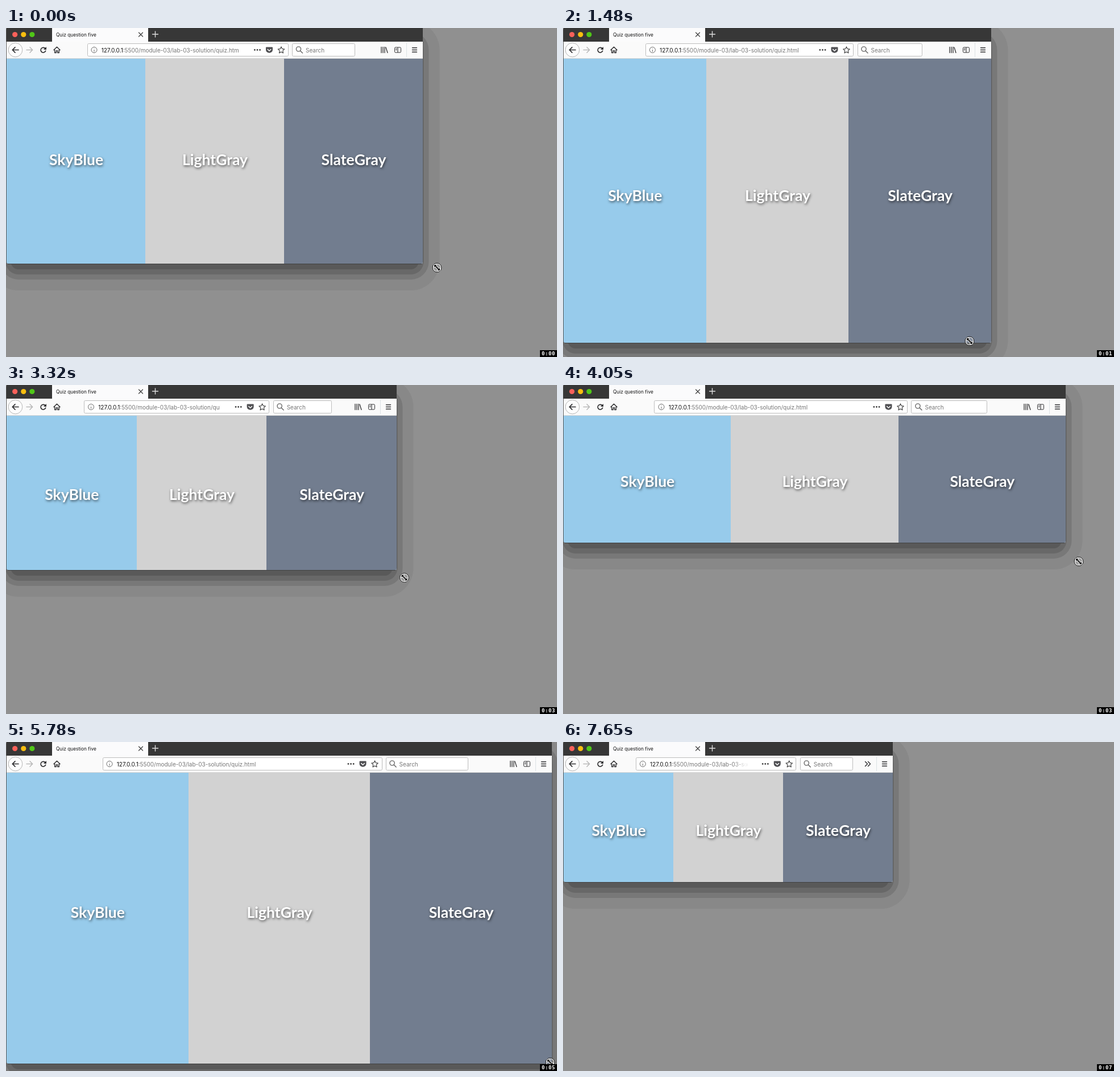
These frames come from a looping animation (969 px wide and 578 px high, 8100 ms). An HTML page with a canvas:

```html
<!DOCTYPE html>
<html lang="en">
<head>
<meta charset="utf-8">
<title>Resizing a three-column page</title>
<style>
html, body { margin: 0; width: 969px; height: 578px; overflow: hidden; background: #909090; }
canvas { display: block; }
</style>
</head>
<body>
<canvas id="stage" width="969" height="578"></canvas>
<script>
const ctx = document.getElementById('stage').getContext('2d');
const LOOP = 8100, STEP = 144.3, LAST = 53;
const TABS = 24, TOP = 54, MID = 38.5;
const INK = '#2f2f31';
const UI = 'Inter, "Open Sans", sans-serif';

// Turning points of the drag: step, window right and bottom, label baseline, pointer x and y
const turns = [
  [0, 733, 414, 241, 758, 421],
  [4, 845, 430, 248, 860, 440],
  [10, 753, 553, 303.5, 715, 550],
  [16, 361, 404, 239, 358, 386],
  [28, 884, 277, 179, 907, 310],
  [31, 945, 350, 212, 950, 365],
  [40, 960, 565, 309, 957, 563],
  [45, 599, 306, 193, 595, 302],
  [LAST, 580, 246, 165, 580, 246]
];

function poseAt(step) {
  const next = Math.max(1, turns.findIndex(p => p[0] >= step));
  const a = turns[next - 1], b = turns[next];
  const k = (step - a[0]) / (b[0] - a[0]);
  const ease = k * k * (3 - 2 * k);
  return a.map((v, i) => v + (b[i] - v) * ease).slice(1);
}

function rect(x, y, w, h, color) {
  ctx.fillStyle = color;
  ctx.fillRect(x, y, w, h);
}

function round(x, y, w, h, r, fill, stroke) {
  ctx.beginPath();
  ctx.roundRect(x, y, w, h, r);
  if (fill) { ctx.fillStyle = fill; ctx.fill(); }
  if (stroke) { ctx.strokeStyle = stroke; ctx.lineWidth = 1; ctx.stroke(); }
}

function disc(x, y, r, fill, stroke, width = 1) {
  ctx.beginPath();
  ctx.arc(x, y, r, 0, Math.PI * 2);
  if (fill) { ctx.fillStyle = fill; ctx.fill(); }
  if (stroke) { ctx.strokeStyle = stroke; ctx.lineWidth = width; ctx.stroke(); }
}

function icon(d, x, y, { stroke, fill, width = 1.5, flip = 1 }) {
  const p = new Path2D(d);
  ctx.save();
  ctx.translate(x, y);
  ctx.scale(flip, 1);
  ctx.lineWidth = width;
  ctx.lineCap = ctx.lineJoin = 'round';
  if (fill) { ctx.fillStyle = fill; ctx.fill(p); }
  if (stroke) { ctx.strokeStyle = stroke; ctx.stroke(p); }
  ctx.restore();
}

function text(s, x, y, font, color, align = 'left') {
  ctx.font = font;
  ctx.textAlign = align;
  ctx.fillStyle = color;
  ctx.fillText(s, x, y);
}

function drawShadow(w, h) {
  const bands = [[29.5, '#888888'], [10.5, '#787878'], [1.5, '#686868'], [-7.5, '#595959']];
  for (const [d, color] of bands)
    round(1 - d, 17.5 - d, w - 1 + 2 * d, h + 2 * d, d + 21, color);
}

// The address and search fields share the spare width, and items drop out as it shrinks
function layout(w) {
  if (w < 440) return { left: 81.5, right: w - 60, fade: 34 };
  const wide = w >= 640, extra = w - (wide ? 733 : 590);
  const [left, right, search] = wide ? [142.5, 495.5, 612.5] : [129, 416.5, 518];
  return {
    wide, home: true, fade: wide ? 0 : 24,
    left: left + extra * .119,
    right: right + extra * .725,
    search: search + extra * .879
  };
}

function drawTabs(w) {
  rect(1, 0, w - 1, TABS, '#373737');
  ['#fa615a', '#fabe10', '#50c718'].forEach((c, i) => disc(15.7 + i * 15.1, 11.5, 4.6, c));
  rect(81, 0, 169, TABS, '#fbfbfc');
  text('Quiz question five', 88, 14.6, '8.3px ' + UI, '#111');
  icon('M-3.5-3.5L3.5 3.5M3.5-3.5L-3.5 3.5', 237, 11.5, { stroke: '#444', width: 1.3 });
  icon('M-5 0H5M0-5V5', 262.5, 11, { stroke: '#ddd', width: 1.4 });
}

function field(left, right) {
  round(Math.round(left) + .5, 27.5, Math.round(right - left), 22, 2, '#fff', '#bdbdbd');
}

function drawAddress({ left, right, fade }) {
  field(left, right);
  disc(left + 12.5, MID, 5, null, '#666');
  icon('M0-2.3V-2.2M0 .2V2.6', left + 12.5, MID, { stroke: '#666', width: 1.1 });

  const host = '127.0.0.1', x = left + 25.2, end = right - 86;
  const rest = ':5500/module-03/lab-03-solution/quiz.html';
  ctx.save();
  ctx.beginPath();
  ctx.rect(x, 28, end - x, 21);
  ctx.clip();
  text(host, x, 42.5, '10px ' + UI, '#111');
  text(rest, x + ctx.measureText(host).width, 42.5, '10px ' + UI, '#777');
  if (fade) {
    const g = ctx.createLinearGradient(end - fade, 0, end, 0);
    g.addColorStop(0, 'rgba(255,255,255,0)');
    g.addColorStop(1, '#fff');
    rect(end - fade, 28, fade, 21, g);
  }
  ctx.restore();

  for (let i = -1; i < 2; i++) disc(right - 53.5 + i * 4.6, MID, 1.4, '#444');
  icon('M-5-5H5Q6-5 6-4V-.5C6 7-6 7-6-.5V-4Q-6-5-5-5Z', right - 32.5, MID, { fill: '#505053' });
  icon('M-2.8-1L0 1.7L2.8-1', right - 32.5, MID, { stroke: '#fff' });
  icon('M0-5.6L1.7-1.9L5.7-1.4L2.8 1.4L3.5 5.4L0 3.5L-3.5 5.4L-2.8 1.4L-5.7-1.4L-1.7-1.9Z',
    right - 11.5, MID, { stroke: '#444', width: 1.2 });
}

function drawSearch(left, right) {
  field(left, right);
  disc(left + 11.5, 37, 4.1, null, '#666', 1.4);
  icon('M0 0L4 4', left + 14.5, 40, { stroke: '#666' });
  text('Search', left + 24, 42.5, '10px ' + UI, '#777');
}

function drawToolbar(w) {
  const f = layout(w);
  rect(1, TABS, w - 1, TOP - TABS, '#fafafa');
  rect(1, TOP - 1, w - 1, 1, '#d5d5d5');
  disc(16.5, MID, 12.3, '#fdfdfd', '#b5b5b5');
  const arrow = 'M5.5 0H-5M-.5-4.7L-5.2 0L-.5 4.7';
  icon(arrow, 16.5, MID, { stroke: INK, width: 1.7 });
  icon(arrow, 41.5, MID, { stroke: '#b8b8b8', flip: -1 });
  icon('M3.6-2.4A4.4 4.4 0 1 0 4.2 1.6', 65.5, MID, { stroke: INK, width: 1.7 });
  icon('M5.5-5.5V-.5H.5Z', 65.5, MID, { fill: INK });
  if (f.home)
    icon('M-5.6 .3L0-5.2L5.6 .3M-3.8 0V5H-1.2V1.5H1.2V5H3.8V0', 89.5, MID, { stroke: INK, width: 1.4 });
  drawAddress(f);
  if (f.search) drawSearch(f.right + 7.5, f.search);
  if (f.wide) {
    icon('M-5-5V5M-2-5V5M1-5V5M3-4.5L6 5', w - 68, MID, { stroke: INK, width: 1.3 });
    round(w - 49.5, 34, 11, 9, 1.5, null, INK);
    icon('M0-4V4M-3.5-2H-2M-3.5 0H-2', w - 44, MID, { stroke: INK, width: 1.1 });
  } else {
    icon('M-4.5-4L-.5 0L-4.5 4M.5-4L4.5 0L.5 4', w - 44, MID, { stroke: INK });
  }
  rect(w - 29, 26, 1, 25, '#dce2e5');
  icon('M-4-3.8H4M-4 0H4M-4 3.8H4', w - 14.5, MID, { stroke: INK, width: 1.4 });
}

function drawPage(w, h, baseline) {
  const col = (w - 1) / 3;
  const columns = [['SkyBlue', '#97cbeb'], ['LightGray', '#d2d2d2'], ['SlateGray', '#727d8f']];
  columns.forEach(([, color], i) => {
    const x = Math.round(1 + col * i);
    rect(x, TOP, w - x, h - TOP, color);
  });
  ctx.save();
  ctx.shadowColor = 'rgba(0,0,0,.6)';
  ctx.shadowBlur = 4;
  ctx.shadowOffsetX = 1;
  ctx.shadowOffsetY = 2;
  columns.forEach(([name], i) =>
    text(name, 1.5 + col * (i + .5), baseline, 'bold 26.5px Papyrus, Lato, sans-serif', '#fff', 'center'));
  ctx.restore();
}

function drawWindow(w, h, baseline) {
  ctx.save();
  ctx.beginPath();
  ctx.roundRect(1, -4, w - 1, h + 4, 3);
  ctx.clip();
  drawPage(w, h, baseline);
  drawTabs(w);
  drawToolbar(w);
  ctx.restore();
  rect(0, 2, 1, h - 4, '#5c5c5c');
  rect(w, TABS, 1, h - TABS - 2, '#5c5c5c');
  rect(3, h, w - 5, 1, '#424242');
}

function drawPointer(x, y) {
  disc(x, y, 7, 'rgba(255,255,255,.15)', '#fff', 1.2);
  disc(x, y, 7.9, null, '#222', 1);
  const arrows = 'M-5-5H-.5L-2-3.4L3.4 2L5 .5V5H.5L2 3.4L-3.4-2L-5-.5Z';
  icon(arrows, x, y, { stroke: '#fff', width: 1.6 });
  icon(arrows, x, y, { fill: '#111' });
}

function drawClock(step) {
  const seconds = Math.max(0, Math.floor((step * STEP - 60) / 1000));
  rect(939, 566, 30, 12, '#000');
  ctx.letterSpacing = '.6px';
  text('0:0' + seconds, 942, 575, 'bold 9px "DejaVu Sans Mono", monospace', '#fff');
  ctx.letterSpacing = '0px';
}

function draw(step) {
  const [right, bottom, baseline, px, py] = poseAt(step);
  const w = Math.round(right), h = Math.round(bottom);
  rect(0, 0, 969, 578, '#909090');
  drawShadow(w, h);
  drawWindow(w, h, baseline);
  if (step < LAST) drawPointer(px, py);
  drawClock(step);
}

const start = performance.now();
function tick() {
  const t = (performance.now() - start) % LOOP;
  draw(Math.min(LAST, Math.floor(t / STEP)));
  requestAnimationFrame(tick);
}
tick();
</script>
</body>
</html>
```
